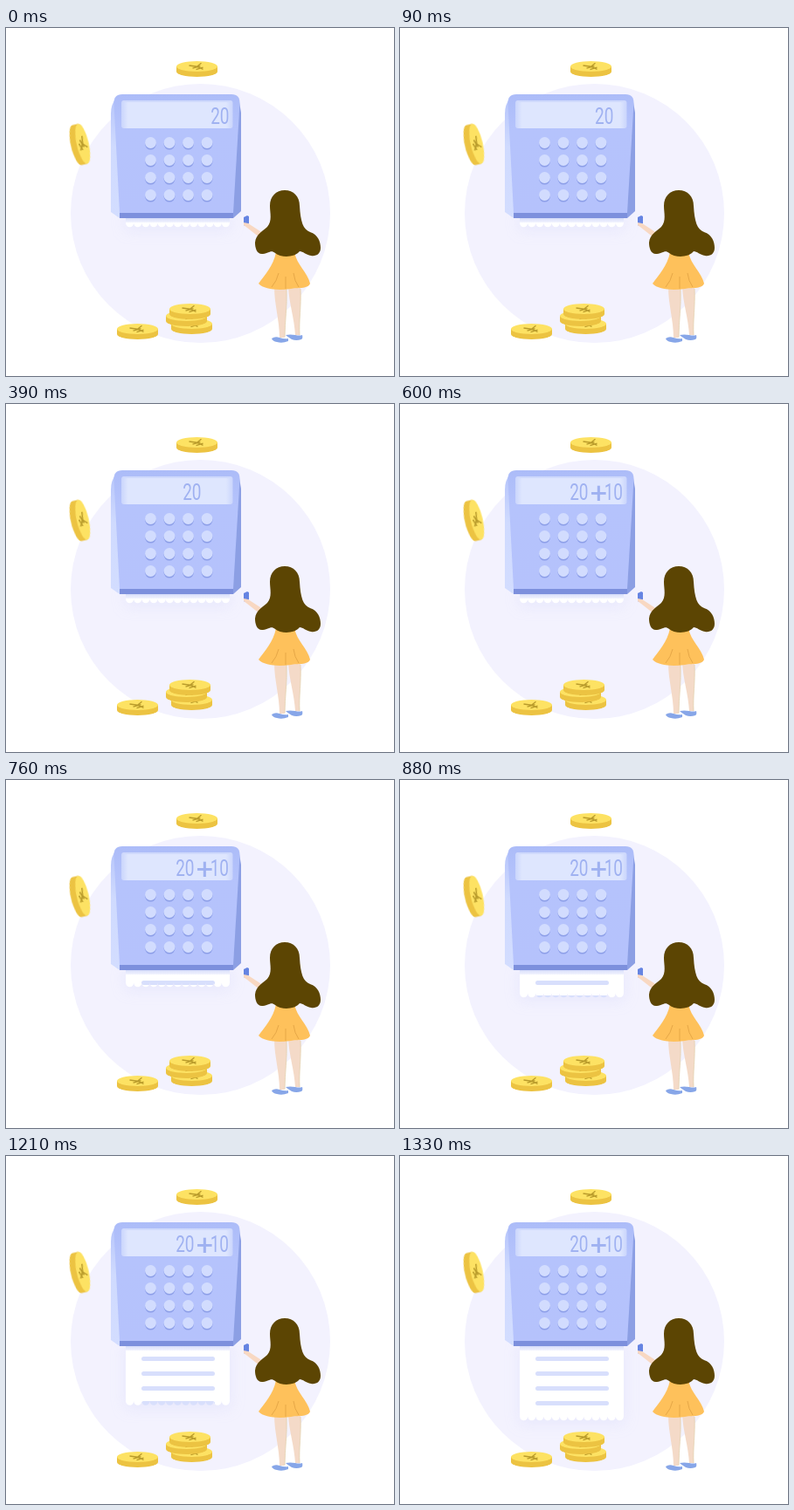
Animation of 444x399 px, one loop 2160 ms. Source, as an HTML page without scripts:

```html
<!DOCTYPE html>
<html lang="en">
<head>
<meta charset="utf-8">
<title>Calculator printing a receipt</title>
<style>
html, body { margin: 0; width: 100%; height: 100%; overflow: hidden; background: #fff; }
svg { display: block; width: 100%; height: 100%; }
.digits { font: 25px Roboto, "Liberation Sans", sans-serif; text-anchor: end; }
.plus { font: 34px Roboto, "Liberation Sans", sans-serif; text-anchor: middle; }
.sum { fill: #9fb1f1; }
.first, .second, .tear { animation: 2160ms infinite; }
.first { animation-name: slide; }
.second { animation-name: appear; animation-timing-function: step-end; }
.tear { animation-name: print; }
.paper { filter: drop-shadow(0 4px 8px #c5c9f944); }

/* 30 ms ticks */
@keyframes slide {
  0% { transform: none; animation-timing-function: steps(7); }
  9.72% { transform: translateX(-26px); animation-timing-function: steps(6); }
  18.05% { transform: translateX(-32px); animation-timing-function: steps(7); }
  27.77%, 100% { transform: translateX(-40px); }
}
@keyframes appear {
  0% { opacity: 0; }
  27.77%, 100% { opacity: 1; }
}
@keyframes print {
  0%, 31.01% { transform: translateY(-75px); animation-timing-function: steps(7); }
  40.74% { transform: translateY(-54px); animation-timing-function: steps(7); }
  50.46% { transform: translateY(-35px); animation-timing-function: steps(8); }
  61.57%, 100% { transform: none; }
}
</style>
</head>
<body>
<svg viewBox="0 0 444 399">
  <defs>
    <linearGradient id="face" x2="0" y2="1">
      <stop stop-color="#acbcf8"/><stop offset=".3" stop-color="#b5c3fc"/><stop offset="1" stop-color="#b5c2fc"/>
    </linearGradient>
    <linearGradient id="side" x2="0" y2="1">
      <stop stop-color="#b6c5fb"/><stop offset=".4" stop-color="#cfdafe"/><stop offset="1" stop-color="#d3ddff"/>
    </linearGradient>
    <linearGradient id="screen">
      <stop stop-color="#cad5fc"/><stop offset=".06" stop-color="#dee6fe"/>
      <stop offset=".94" stop-color="#dee6fe"/><stop offset="1" stop-color="#cad5fc"/>
    </linearGradient>
    <linearGradient id="shade" x2="0" y2="1">
      <stop stop-color="#cdd5f8"/><stop offset="1" stop-color="#e4e7fd" stop-opacity=".5"/>
    </linearGradient>
    <mask id="torn">
      <g class="tear" fill="#fff" stroke="#fff">
        <path d="M137 200h119v99h-119z" stroke="none"/>
        <path d="M141.6 298.8h110" stroke-width="9" stroke-linecap="round" stroke-dasharray="0 9.15"/>
      </g>
    </mask>
    <g id="coin">
      <path d="M-23.5-3v6a23.5 6 0 0 0 47 0v-6z" fill="#ecc342"/>
      <ellipse cy="-3" rx="23.5" ry="6" fill="#fde263"/>
      <path d="M-9-4l9 1.2 5-4M0-2.8l7 3.2M-5-.8l9-2.6M-1 .6l8-2.4" fill="none" stroke="#b99b2b" stroke-width="1.3"/>
    </g>
    <g id="key">
      <circle cy="1.6" r="6.5" fill="#8d9fe8"/>
      <circle r="6.5" fill="#d2dcfe"/>
    </g>
    <g id="keys">
      <use href="#key" x="165.5"/><use href="#key" x="187"/>
      <use href="#key" x="208.5"/><use href="#key" x="230"/>
    </g>
  </defs>

  <circle cx="222.5" cy="212.5" r="148.5" fill="#f3f2fe"/>

  <g class="paper">
    <g mask="url(#torn)">
      <path d="M137 212h119v92h-119z" fill="#fff"/>
      <path d="M157.5 232.5h79m-79 17h79m-79 17h79m-79 17h79" stroke="#d8dffc" stroke-width="5" stroke-linecap="round"/>
    </g>
  </g>
  <path d="M137 217h119v6h-119z" fill="url(#shade)"/>

  <g>
    <path d="M126 80Q120 88 120 98V211L130 218 133 100z" fill="url(#side)"/>
    <path d="M262 80L267 85 269 97V210L260 218 256 150z" fill="#8c9fe4"/>
    <path d="M130 211h130v7h-130z" fill="#7d90dd"/>
    <path d="M133 76H258Q268 76 267.500 87L260 212H130L123.500 87Q123 76 133 76z" fill="url(#face)"/>
    <rect x="132" y="83" width="127.500" height="32" rx="3" fill="url(#screen)"/>
    <path d="M134 84h123" stroke="#cfd9fc" stroke-width="2"/>
    <use href="#keys" y="131.500"/><use href="#keys" y="151.500"/>
    <use href="#keys" y="171.500"/><use href="#keys" y="191.500"/>
  </g>

  <g class="sum">
    <g class="first"><text class="digits" transform="translate(255.500 110) scale(.76 1)">20</text></g>
    <g class="second">
      <text class="plus" x="227.500" y="112.500">+</text>
      <text class="digits" transform="translate(255 110) scale(.76 1)">10</text>
    </g>
  </g>

  <use href="#coin" x="218.500" y="47"/>
  <use href="#coin" transform="translate(84.500 133.500) rotate(77) scale(1 1.150)"/>
  <use href="#coin" x="150.500" y="348"/>
  <use href="#coin" x="212.500" y="342"/>
  <use href="#coin" x="206.500" y="333"/>
  <use href="#coin" x="210.500" y="325"/>

  <g>
    <path d="M272 217l4-2 2 1v8l-4 3-2-1z" fill="#6584e2"/>
    <path d="M272 223l5 1 17 11-4 5-14-11-4-3z" fill="#f8d8c2"/>
    <path d="M307 297h14c1 20-2 38-2 58h-6c0-20-6-38-6-58zm16 0h14c1 20-2 36-1 55h-5c-1-19-7-36-8-55z" fill="#f4dac8"/>
    <path d="M321 299c1 20-2 37-2 55M337 299c1 20-2 36-1 53" fill="none" stroke="#e2d0ad" stroke-width=".8"/>
    <path d="M304 356q4-3 9-1 6 2 10 1v3q-7 3-13 1-5-1-6-4zm16-4q5-1 11 0 5 1 8 0 1 4-1 5-6 2-11 0-5-3-7-5z" fill="#87a6e8"/>
    <path d="M309 257H330C333 272 345 280 348 293 345 300 333 297 326 299 312 301 295 300 289 293 296 283 306 273 309 257z" fill="#fec15b"/>
    <path d="M312 281q-2 9-8 16M320 285v14M329 281q1 9 6 16" fill="none" stroke="#e6a747"/>
    <path d="M319 186C329 186 336 193 336 204 337 222 340 231 348 234 357 237 360 245 360 252 360 259 355 262 349 261 343 260 340 256 336 256 331 263 315 264 308 258 303 254 302 258 294 259 287 260 285 252 285 246 286 236 294 233 299 228 305 221 302 212 302 204 302 193 309 186 319 186z" fill="#5c4503"/>
  </g>
</svg>
</body>
</html>
```
